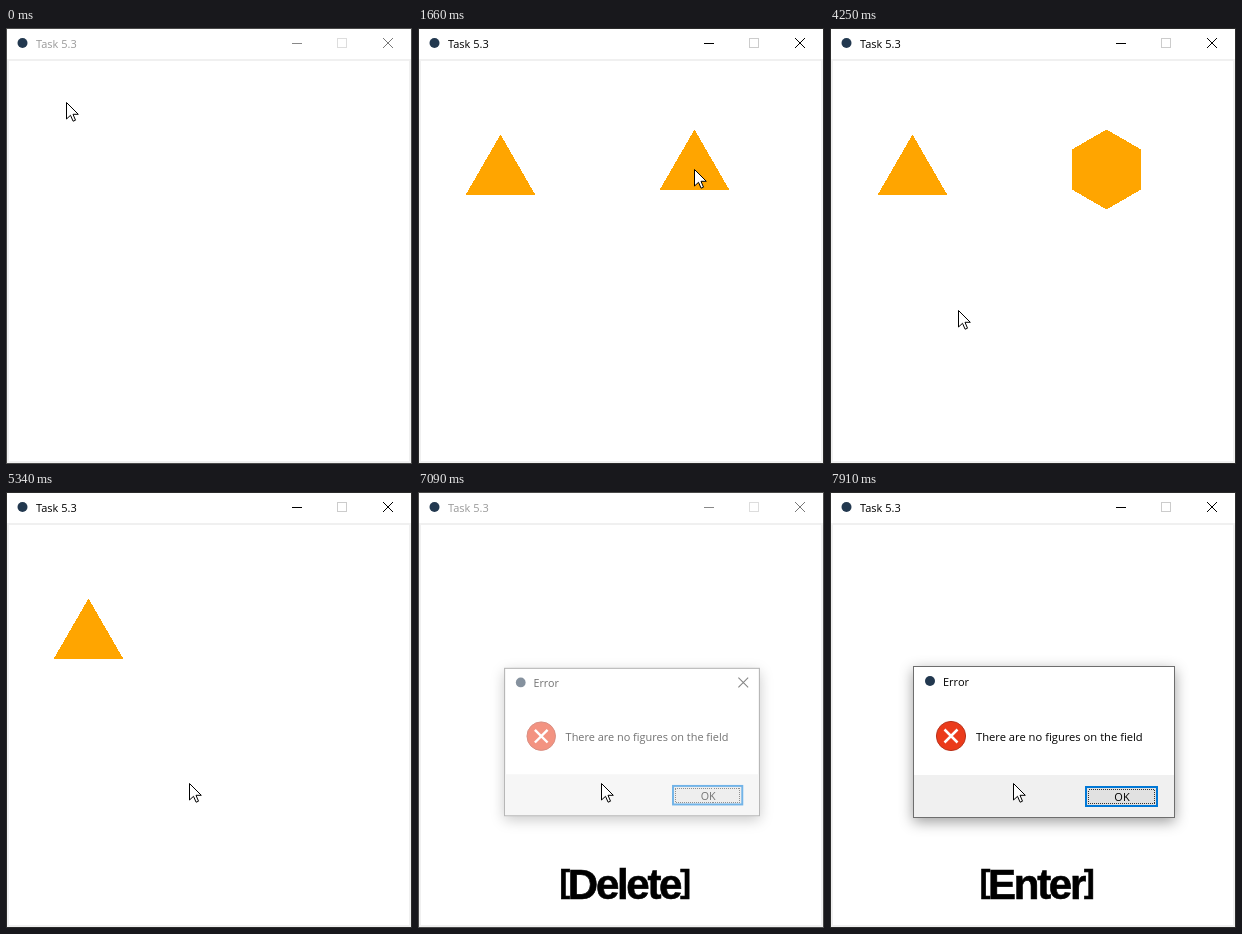
Write an HTML page that moves like this. It is 406 by 436 pixels and loops after 8 s.

```html
<!DOCTYPE html>
<html lang="en">
<head>
<meta charset="utf-8">
<title>Task 5.3</title>
<style>
  html, body { margin: 0; width: 100%; height: 100%; overflow: hidden; background: #fff; }
  svg { display: block; width: 406px; height: 436px; }
  .ui { font: 11px "Open Sans", "Noto Sans", sans-serif; }
  .msg { font-size: 11.2px; }
  .caption { font: bold 42px "Liberation Sans", Arial, sans-serif; letter-spacing: -2.3px; text-anchor: middle;
    stroke: #000; stroke-width: .6; }
  .caption .bracket { font-size: 32px; }
  .click { letter-spacing: -3px; }
  .star { font: 22px "Liberation Serif", serif; text-anchor: middle; fill: #333; }
  .crisp { shape-rendering: crispEdges; }
  .line { fill: none; }
  #dialog { filter: drop-shadow(0 4px 7px rgba(0, 0, 0, .38)); }
</style>
</head>
<body>
<svg viewBox="0 0 406 436" xmlns="http://www.w3.org/2000/svg">
  <rect id="frame" class="crisp" width="406" height="436"/>
  <rect class="crisp" x="1" y="1" width="404" height="434" fill="#fff"/>
  <rect class="crisp" x="1" y="31" width="404" height="404" fill="#f0f0f0"/>
  <rect class="crisp" x="3" y="33" width="400" height="400" fill="#fff"/>

  <circle cx="16.5" cy="15" r="5" fill="#22384f"/>
  <text id="title" class="ui" x="30" y="20">Task 5.3</text>
  <path id="minimise" class="line crisp" d="M286 15.5h10"/>
  <rect id="maximise" class="line crisp" x="331.5" y="10.5" width="9" height="9"/>
  <path id="close" class="line" d="M377 10l10 10m0-10l-10 10"/>

  <g class="crisp" fill="#ffa500">
    <polygon id="left"/>
    <polygon id="right"/>
  </g>

  <g id="click">
    <text class="star" x="161" y="390">*</text>
    <text class="caption click" x="206" y="406.5">click</text>
    <text class="star" x="253" y="390">*</text>
  </g>
  <text id="delete" class="caption" x="206" y="406.5"><tspan class="bracket" dy="-6.7">[</tspan><tspan dy="6.7">Delete</tspan><tspan class="bracket" dy="-6.7">]</tspan></text>
  <text id="enter" class="caption" x="206" y="406.5"><tspan class="bracket" dy="-6.7">[</tspan><tspan dy="6.7">Enter</tspan><tspan class="bracket" dy="-6.7">]</tspan></text>

  <g id="dialog">
    <rect x="83.5" y="174.5" width="261" height="151" fill="#fff" stroke="#6e6e6e"/>
    <rect x="84" y="283" width="260" height="42" fill="#f0f0f0"/>
    <circle cx="100" cy="189" r="5" fill="#22384f"/>
    <text class="ui" x="113" y="194">Error</text>
    <path id="dialogClose" class="line" d="M323 184l10 10m0-10l-10 10" stroke="#222" stroke-width="1.1"/>
    <circle cx="121" cy="244" r="14.6" fill="#eb3b1b" stroke="#b9331c"/>
    <path class="line" d="M114.5 237.500l13 13m0-13l-13 13" stroke="#fff" stroke-width="2.5"/>
    <text class="ui msg" x="146" y="249">There are no figures on the field</text>
    <rect x="256" y="295" width="71" height="19" fill="#e1e1e1" stroke="#0078d7" stroke-width="2"/>
    <rect class="line crisp" x="258.500" y="297.500" width="66" height="14" stroke="#333" stroke-dasharray="1 1"/>
    <text class="ui" x="292" y="309" text-anchor="middle">OK</text>
  </g>

  <path id="cursor" d="M0 0V16.500L4 12.800L6.600 18.700L9 17.700L6.500 11.800H11.800Z" fill="#fff" stroke="#000"/>
</svg>
<script>
const LOOP = 8000;
const el = id => document.getElementById(id);
const within = (t, spans) => spans.some(([a, b]) => t >= a && t < b);
// Each key is [start, ...values]; values hold until the next key.
const held = (t, keys) => keys.filter(k => k[0] <= t).pop().slice(1);

const pointer = [
  [0, 60, 74], [90, 64, 86], [160, 73, 116], [250, 82, 146],
  [750, 86, 145], [1000, 108, 138], [1090, 176, 134], [1160, 240, 138], [1250, 276, 141],
  [3840, 264, 152], [3910, 238, 178], [4000, 198, 220],
  [4090, 160, 256], [4160, 138, 275], [4250, 128, 282], [4840, 183, 291]
];
const leftSides = [[0, 0], [410, 3], [6250, 0]];
const rightSides = [[0, 0], [1410, 3], [2410, 4], [2750, 5], [3090, 6], [4910, 0]];
const captions = {
  click: [[250, 750], [1250, 1660], [2340, 3340]],
  delete: [[4840, 5340], [6090, 6500], [6750, 7250]],
  enter: [[7660, LOOP]]
};
// Opacity and scale while the dialog opens.
const dialogKeys = [[0, 0, 1], [7000, .18, .94], [7090, .55, .976], [7160, .85, .992], [7250, 1, 1]];

function polygon(n, cx, cy, r = 40) {
  return Array.from({ length: n }, (_, i) => {
    const a = 2 * Math.PI * i / n;
    return `${(cx + r * Math.sin(a)).toFixed(2)},${(cy - r * Math.cos(a)).toFixed(2)}`;
  }).join(" ");
}

function draw(t) {
  const active = within(t, [[410, 7000], [7910, LOOP]]);
  el("frame").setAttribute("fill", active ? "#2b2b2b" : "#4a4a4a");
  el("title").setAttribute("fill", active ? "#000" : "#999");
  el("minimise").setAttribute("stroke", active ? "#000" : "#888");
  el("maximise").setAttribute("stroke", active ? "#ccc" : "#ddd");
  el("close").setAttribute("stroke", active ? "#000" : "#777");

  el("left").setAttribute("points", polygon(held(t, leftSides)[0], 82.5, 146.5));
  el("right").setAttribute("points", polygon(held(t, rightSides)[0], 276.5, 141.5));

  for (const id in captions) {
    el(id).setAttribute("visibility", within(t, captions[id]) ? "visible" : "hidden");
  }

  const [alpha, scale] = held(t, dialogKeys);
  const dialog = el("dialog");
  dialog.setAttribute("visibility", alpha ? "visible" : "hidden");
  dialog.setAttribute("opacity", alpha);
  dialog.setAttribute("transform", `translate(214 250) scale(${scale}) translate(-214 -250)`);
  el("dialogClose").setAttribute("opacity", t < 7910 ? 1 : 0);

  const [x, y] = held(t, pointer);
  el("cursor").setAttribute("transform", `translate(${x + .5} ${y + .5})`);
}

const start = performance.now();
function tick() {
  draw((performance.now() - start) % LOOP);
  requestAnimationFrame(tick);
}
tick();
</script>
</body>
</html>
```
